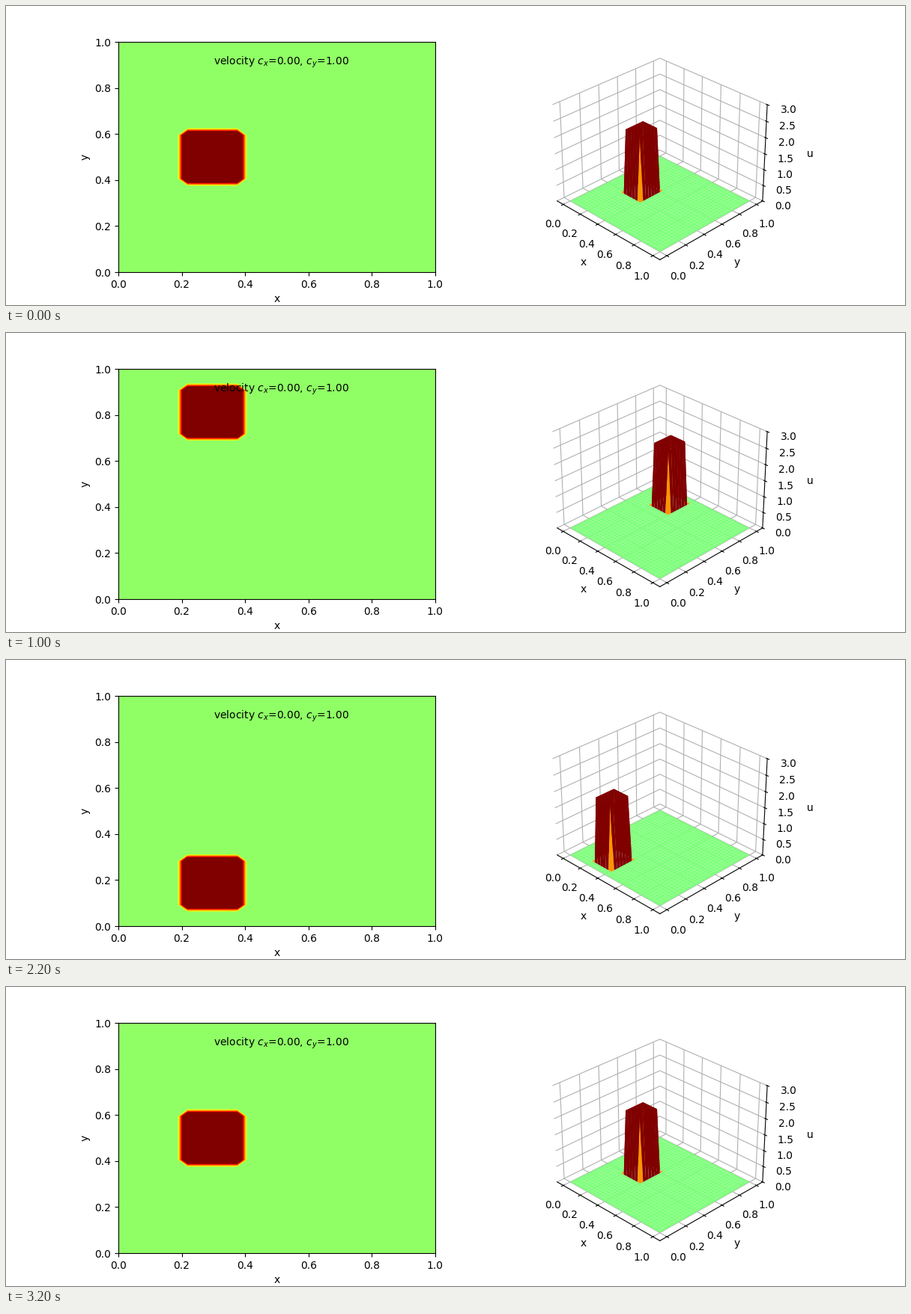
Animation, 1200 px wide and 400 px high, one loop 3300 ms. Source, as a matplotlib script:

```python
import numpy as np
import matplotlib.pyplot as plt
from matplotlib.animation import FuncAnimation

CELLS = 32
CX, CY = 0.0, 1.0
LOOK = dict(cmap="jet", vmin=-1, vmax=1)

axis = np.linspace(0, 1, CELLS + 1)
X, Y = np.meshgrid(axis, axis)
block = np.where((X >= 0.2) & (X <= 0.4) & (Y >= 0.4) & (Y <= 0.6), 2.0, 0.0)

fig = plt.figure(figsize=(12, 4), dpi=100)

flat = fig.add_subplot(1, 2, 1)
flat.set_xlabel("x")
flat.set_ylabel("y")
flat.text(0.3, 0.9, f"velocity $c_x$={CX:.2f}, $c_y$={CY:.2f}")

solid = fig.add_subplot(1, 2, 2, projection="3d")
solid.set_xlabel("x")
solid.set_ylabel("y")
solid.set_zlabel("u")
solid.set_zlim(0, 3)
solid.view_init(30, -45)
for side in (solid.xaxis, solid.yaxis, solid.zaxis):
    side.set_pane_color((1, 1, 1, 1))

drawn = []


def wave(step):
    """Block carried one cell per step along y on a periodic grid."""
    rows = np.roll(block[:-1], step, axis=0)
    return np.vstack([rows, rows[:1]])


def update(step):
    while drawn:
        drawn.pop().remove()
    u = wave(step)
    drawn.append(flat.contourf(X, Y, u, levels=np.linspace(0, 2, 21), **LOOK))
    drawn.append(solid.plot_surface(X, Y, u, **LOOK))
    return []


anim = FuncAnimation(fig, update, frames=CELLS + 1, interval=100,
                     repeat=True, repeat_delay=0)
plt.show()
```
